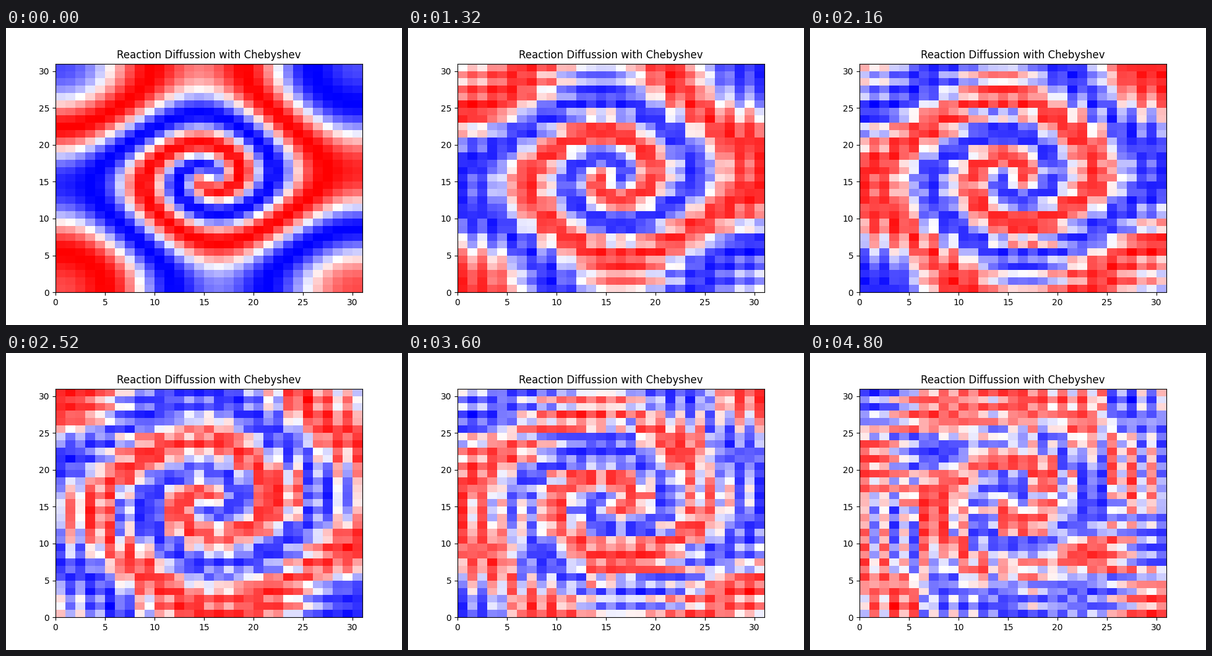
Write a matplotlib script that moves like this. It is 640x480 px and loops after 4.92 s.

```python
import numpy as np
import matplotlib.pyplot as plt
from matplotlib.animation import FuncAnimation

N = 30            # Chebyshev order, giving N + 1 points per side
HALF = 10         # half width of the domain
DIFF = 0.1        # diffusion of both species
BETA = 1.0
FRAMES = 41
DT = 0.5          # model time between frames
SUBSTEPS = 25


def cheb(n):
    """Chebyshev differentiation matrix and its points."""
    k = np.arange(n + 1)
    x = np.cos(np.pi * k / n)
    c = np.where((k == 0) | (k == n), 2.0, 1.0) * (-1.0) ** k
    dx = x[:, None] - x[None, :]
    d = np.outer(c, 1 / c) / (dx + np.eye(n + 1))
    return d - np.diag(d.sum(axis=1)), x


D, x = cheb(N)
D[[0, N]] = 0     # no-flux edges
D2 = D @ D / HALF**2


def laplacian(f):
    return D2 @ f + f @ D2.T


def rhs(w):
    u, v = w
    a2 = u * u + v * v
    lam, omega = 1 - a2, -BETA * a2
    return np.array([
        lam * u - omega * v + DIFF * laplacian(u),
        omega * u + lam * v + DIFF * laplacian(v),
    ])


def rk4(w, h):
    k1 = rhs(w)
    k2 = rhs(w + h / 2 * k1)
    k3 = rhs(w + h / 2 * k2)
    k4 = rhs(w + h * k3)
    return w + h / 6 * (k1 + 2 * k2 + 2 * k3 + k4)


def spiral():
    X, Y = np.meshgrid(HALF * x, HALF * x)
    r = np.hypot(X, Y)
    phase = np.arctan2(Y, X) - r
    return np.tanh(r) * np.array([np.cos(phase), np.sin(phase)])


def solve():
    w = spiral()
    states = [w[0]]
    for _ in range(FRAMES - 1):
        for _ in range(SUBSTEPS):
            w = rk4(w, DT / SUBSTEPS)
        states.append(w[0])
    return states


states = solve()

fig, ax = plt.subplots(figsize=(6.4, 4.8), dpi=100)
mesh = ax.pcolormesh(states[0], cmap="bwr")
ax.set_title("Reaction Diffussion with Chebyshev")


def update(i):
    mesh.set_array(states[i])
    mesh.autoscale()
    return (mesh,)


anim = FuncAnimation(fig, update, frames=FRAMES, interval=120,
                     repeat=True, repeat_delay=0, blit=False)
plt.show()
```
